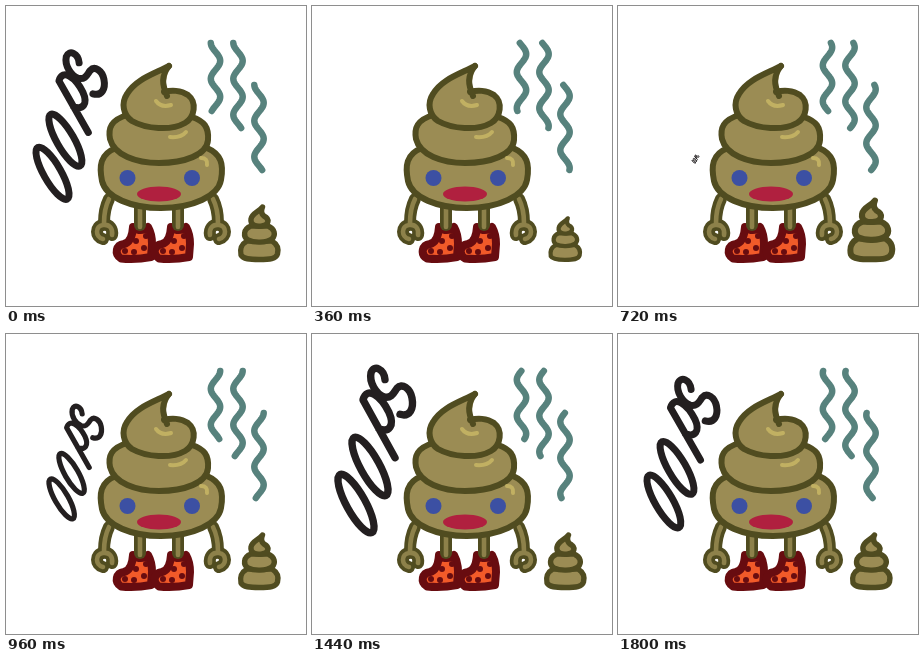
An HTML page for the animation above (1920 ms loop, 300 by 300 pixels).

```html
<!DOCTYPE html>
<html lang="en">
<head>
<meta charset="utf-8">
<title>Oops</title>
<style>
html, body { margin: 0; width: 100%; height: 100%; overflow: hidden; background: #fff; }
svg { display: block; width: 100vw; height: 100vh; }
path, ellipse { stroke-linecap: round; stroke-linejoin: round; }
.skin { fill: #9b8c54; stroke: #504c20; stroke-width: 6; }
#pile .skin { stroke-width: 5.4; }
.edge { fill: none; stroke: #504c20; stroke-width: 12; }
.core { fill: none; stroke: #8d814a; stroke-width: 4.6; }
.shine { fill: none; stroke: #c1b062; stroke-width: 4; }
.boot { fill: #f15a29; stroke: #680c10; stroke-width: 8; }
.dots { fill: #680c10; }
.steam { fill: none; stroke: #57827d; stroke-width: 6.5; }
#word { fill: none; stroke: #231f20; }
#word > * { vector-effect: non-scaling-stroke; }
</style>
</head>
<body>
<svg viewBox="0 0 300 300">
  <defs>
    <g id="arm">
      <path class="edge" d="M103 193Q98 203 98 217"/>
      <path class="edge" d="M97 233C89 231 89 220 97 219C104 218 107 223 106 229"/>
      <path class="core" d="M103 193Q98 203 98 217"/>
      <path class="core" d="M97 233C89 231 89 220 97 219C104 218 107 223 106 229"/>
    </g>
    <g id="foot">
      <path class="boot" d="M127 221Q135 227 142 221Q146 228 146 238L145 251Q130 254 115 252.500C108 248 110 239 118 238Q126 236 127 221Z"/>
      <g class="dots">
        <circle cx="119" cy="245" r="3"/><circle cx="128" cy="246" r="3"/>
        <circle cx="130" cy="235" r="3"/><circle cx="140" cy="230" r="3"/>
        <circle cx="138" cy="242" r="3"/>
      </g>
      <path class="edge" d="M134 200V219"/>
      <path class="core" d="M134 200V221"/>
    </g>
  </defs>

  <g id="steam"></g>

  <use href="#foot"/>
  <use href="#foot" x="38"/>
  <use href="#arm"/>
  <use href="#arm" transform="matrix(-1 0 0 1 310 0)"/>

  <path class="skin" d="M110 142C94 148 93 160 96 175C100 192 126 202 155 202C187 202 212 190 215 174C218 158 215 148 201 142Z"/>
  <path class="skin" d="M121 109C105 114 102 122 104 133C108 149 130 157 153 157C178 157 201 149 202 134C203 121 198 115 186 111Z"/>
  <path class="skin" d="M163 60C148 68 130 73 121 88C115 97 117 109 126 115C140 123 165 125 179 117C189 111 191 96 182 89C175 84 165 84 158 86"/>
  <path class="skin" style="fill:none" d="M163 60C155 70 156 78 161 90"/>
  <path class="shine" d="M150 95Q155 102 165 99M164 131Q175 132 180 126M195 152Q202 152 201 159"/>
  <circle cx="121.500" cy="172" r="8" fill="#3c50a3"/>
  <circle cx="186" cy="172" r="8" fill="#3c50a3"/>
  <ellipse cx="153" cy="188" rx="22" ry="7.500" fill="#b0203f"/>

  <g id="pile">
    <path class="skin" d="M241 235C234 239 234 244 235 249C237 253 244 253.500 253 253.500C264 253.500 270 253 271.500 248C273 242 271 238 266 235Z"/>
    <path class="skin" d="M245 220C237 223 237 231 242 234C248 237 260 237 266 233C270 229 269 223 262 220Z"/>
    <path class="skin" d="M256.500 201C253 206 246 207 245 213C244 219 250 221 256 220C263 219 264 213 258 210Q254 207 256.500 201Z"/>
  </g>

  <g id="word">
    <ellipse cx="44" cy="168.500" rx="34" ry="9.500" transform="rotate(62 44 168.500)"/>
    <ellipse cx="58" cy="130" rx="34" ry="9.500" transform="rotate(62 58 130)"/>
    <path d="M83 121L51 61C55 46 69 57 77 74C83 88 77 95 67 91"/>
    <path d="M73 40C72 29 62 24 59 33C57 43 64 55 72 58C80 60 82 53 85 49C90 43 98 49 100 59C102 70 98 79 88 76"/>
  </g>
</svg>
<script>
const LOOP = 1920, STEP = 120;
const $ = id => document.getElementById(id);
const word = $('word'), pile = $('pile');

// centre x, top, bottom
const plumes = [[209.5, 37, 105], [232, 37, 122], [253, 79, 164]].map(p => {
  const path = document.createElementNS('http://www.w3.org/2000/svg', 'path');
  path.setAttribute('class', 'steam');
  $('steam').append(path);
  return { path, p };
});

// time, then left, top, right, bottom of the lettering and its line width
const wordKeys = [
  [720, 74, 149, 81, 157, 1],
  [960, 43, 72, 94.5, 185, 5.2],
  [1200, 26, 28, 99, 199, 7.4],
  [1440, 26, 34, 99, 199, 7.4],
  [1800, 29, 45, 97.5, 194, 7],
  [1920, 30, 46.5, 97, 193.5, 7]
];
const pileKeys = [[120, .1], [360, .79], [480, 1], [600, 1.1], [720, 1.12], [840, 1.05], [960, 1], [1920, 1]];

function tween(keys, t) {
  let i = 1;
  while (i < keys.length - 1 && t > keys[i][0]) i++;
  const a = keys[i - 1], b = keys[i];
  const k = Math.min(1, Math.max(0, (t - a[0]) / (b[0] - a[0])));
  return a.slice(1).map((v, j) => v + (b[j + 1] - v) * k);
}

// a sine wave that climbs one wavelength per loop
function steam(cx, top, bottom, t) {
  const pts = [];
  for (let y = top; y <= bottom; y++) {
    const turn = (t - 950) / LOOP + (y - top) / 36;
    pts.push((cx + 4.7 * Math.cos(turn * 2 * Math.PI)).toFixed(2) + ' ' + y);
  }
  return 'M' + pts.join('L');
}

function draw(ms) {
  const t = Math.floor(ms % LOOP / STEP) * STEP;
  for (const { path, p } of plumes) path.setAttribute('d', steam(...p, t));

  const act = t || LOOP; // the act begins one step into the loop
  const [s] = tween(pileKeys, act);
  pile.setAttribute('transform', `translate(253 255) scale(${s}) translate(-253 -255)`);

  word.style.display = act < 720 ? 'none' : '';
  const [l, top, r, b, w] = tween(wordKeys, act);
  const sx = (r - l) / 73, sy = (b - top) / 171;
  word.setAttribute('transform', `matrix(${sx} 0 0 ${sy} ${l - 26 * sx} ${top - 28 * sy})`);
  word.style.strokeWidth = w * Math.min(innerWidth, innerHeight) / 300;
}

const start = performance.now();
function tick() {
  draw(performance.now() - start);
  requestAnimationFrame(tick);
}
tick();
</script>
</body>
</html>
```
